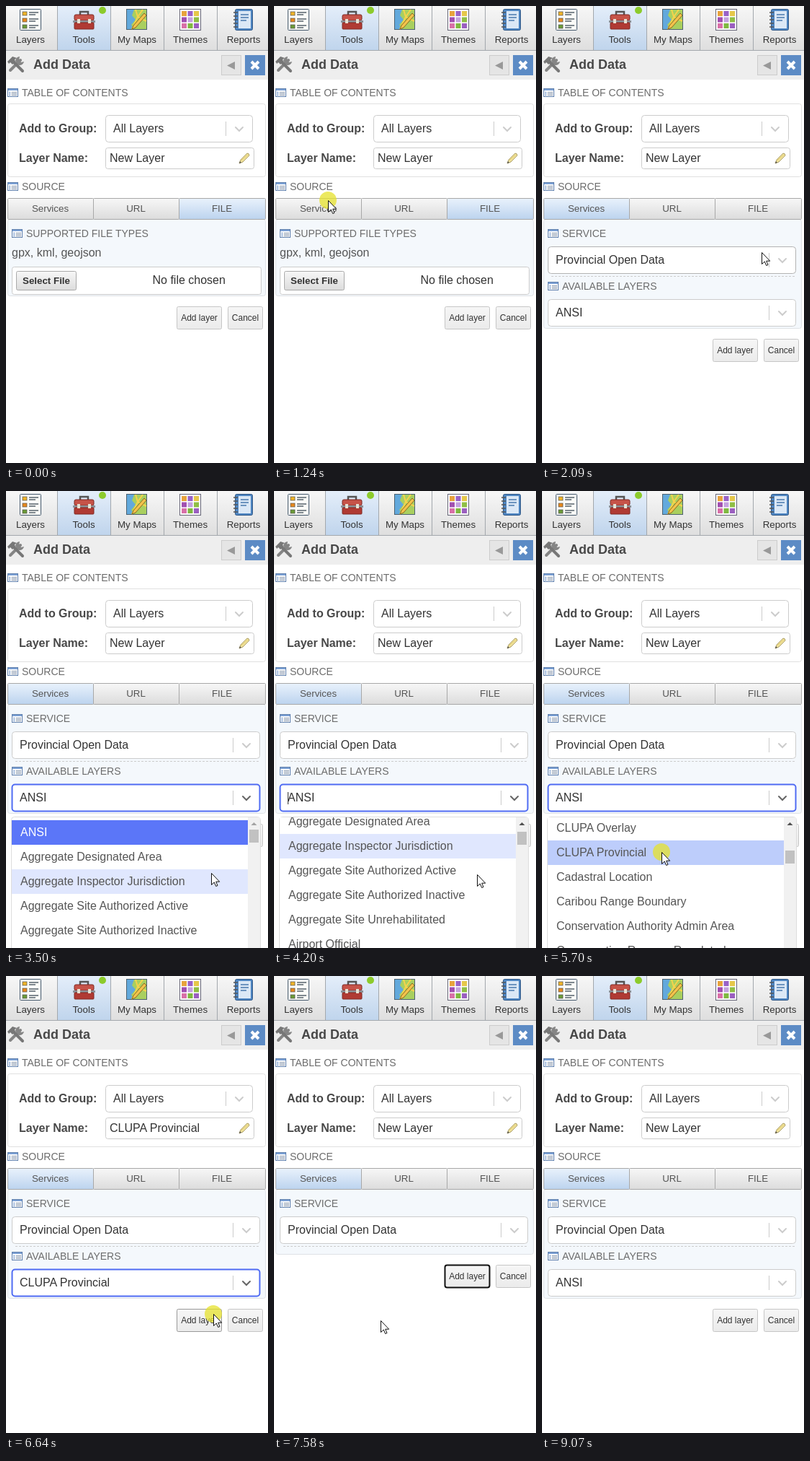
An HTML page for the animation above (9.15 s loop, 364 by 633 pixels).

```html
<!DOCTYPE html>
<html lang="en">
<head>
<meta charset="utf-8">
<title>Add Data</title>
<style>
  html, body { margin: 0; width: 100%; height: 100%; overflow: hidden; background: #fff; }
  svg { display: block; width: 364px; height: 633px; font: 16px "Liberation Sans", Arial, sans-serif; fill: #333; }
  .b { font-weight: bold; fill: #484848; }
  .head { font-size: 14px; fill: #6c6c6c; }
  .small { font-size: 13.333px; }
  .btn { font-size: 12px; }
  .mid { text-anchor: middle; }
  .box { fill: #fff; stroke: #ccc; }
  .line { fill: none; stroke: #ccc; }
  .row { fill: #555; }
</style>
</head>
<body>
<svg id="stage" viewBox="0 0 364 633"></svg>
<script>
const LOOP = 9150, ROW = 34, LIST_TOP = 456;
const layers = ['ANSI', 'Aggregate Designated Area', 'Aggregate Inspector Jurisdiction',
  'Aggregate Site Authorized Active', 'Aggregate Site Authorized Inactive',
  'Aggregate Site Unrehabilitated', 'Airport Official', 'Aquatic Resource Area Line Segment',
  'Aquatic Resource Area Polygon|Segment', 'Bait Harvest Area', 'Bear Management Area',
  'Building As Symbol', 'Building To Scale', 'Built Up Area', 'CLUPA Overlay', 'CLUPA Provincial',
  'Cadastral Location', 'Caribou Range Boundary', 'Conservation Authority Admin Area',
  'Conservation Reserve Regulated', 'Cottage Residential Site'];

// Markup helpers
const text = (x, y, s, cls = '', extra = '') => `<text x="${x}" y="${y}" class="${cls}" ${extra}>${s}</text>`;
const rect = (x, y, w, h, extra = '') => `<rect x="${x}" y="${y}" width="${w}" height="${h}" ${extra}/>`;
const path = (d, extra = '') => `<path d="${d}" ${extra}/>`;
const group = (id, body, extra = '') => `<g id="${id}" ${extra}>${body}</g>`;
const at = (x, y, body) => `<g transform="translate(${x} ${y})">${body}</g>`;
const gradient = (id, top, bottom) => `<linearGradient id="${id}" x2="0" y2="1">
  <stop stop-color="${top}"/><stop offset="1" stop-color="${bottom}"/></linearGradient>`;

const header = (x, y, s) => at(x, y - 11,
  rect(.5, .5, 14, 11, 'fill="#fff" stroke="#6080ad"') + rect(1, 1, 13, 2, 'fill="#7ba0d4"') +
  path('M2.5 5.5H4M2.5 7.5H4M2.5 9.5H4', 'stroke="#2f66b5"') +
  path('M5.5 5.5H13M5.5 7.5H13M5.5 9.5H13', 'stroke="#8998ad"')) + text(x + 20, y, s, 'head');

const select = (id, x, y, w, value) => at(x, y,
  rect(.5, .5, w - 1, 37, `id="${id}Box" class="box" rx="4"`) +
  path(`M${w - 37.5} 9V29`, 'class="line"') +
  path(`M${w - 24} 17l5 5l5-5`, `id="${id}Arrow" fill="none" stroke="#ccc" stroke-width="2" stroke-linecap="round"`) +
  text(11, 24, value, '', `id="${id}Value"`));

const button = (id, x, w, s) => rect(x + .5, .5, w - 1, 31, `id="${id}" rx="2" fill="url(#button)" stroke="#c6c6c6"`) +
  text(x + w / 2, 20, s, 'btn mid');

// Navigation icons, each in a 30px square
const listIcon = rect(.5, .5, 29, 29, 'rx="1" fill="#fcfcf8" stroke="#44586c"') +
  ['#f0b429', '#e8891c', '#6b9b37'].map((c, i) => rect(4, 4 + i * 9, 6, 5, `fill="${c}" stroke="#555" stroke-width=".7"`) +
    path(`M13 ${5 + i * 9}h13m-13 3h9`, 'stroke="#56616c" stroke-width="1.3"')).join('');
const toolboxIcon = path('M10 8V4h11v4', 'fill="none" stroke="#555" stroke-width="2.5"') +
  rect(2, 8, 27, 8, 'rx="2" fill="#c65349" stroke="#7e2923"') +
  rect(0, 16, 31, 3, 'fill="#8c9299"') + rect(2, 19, 27, 9, 'rx="1" fill="#b03a33" stroke="#7e2923"') +
  rect(6, 14, 4, 6, 'fill="#e6e1d2"') + rect(21, 14, 4, 6, 'fill="#e6e1d2"');
const mapIcon = rect(.5, .5, 28, 28, 'fill="#a9cf5f" stroke="#4c6170"') +
  path('M1 1h10l-3 8 5 6-6 7 4 6H1z', 'fill="#62a9dc"') +
  path('M13 1l3 10 12 6M8 28l8-17 7-10', 'fill="none" stroke="#f6d34c" stroke-width="2"') +
  path('M10 23L25 6l3 3L13 26l-5 2z', 'fill="#f2c24d" stroke="#8b6a1f"');
const themesIcon = rect(.5, .5, 29, 29, 'fill="#fff" stroke="#667"') +
  ['#e8a33d', '#9a62c8', '#e6c84a', '#a14fb0', '#c4a2e0', '#8fbf45', '#d870a8', '#7fb840', '#9b5fc0']
    .map((c, i) => rect(3 + i % 3 * 8.5, 3 + Math.floor(i / 3) * 8.5, 7, 7, `fill="${c}"`)).join('');
const reportIcon = rect(4.5, .5, 24, 29, 'rx="2" fill="#4f86c2" stroke="#2c5585"') +
  rect(9, 3, 17, 24, 'fill="#dbe8f6"') + path('M12 8h11m-11 4h11m-11 4h8', 'stroke="#4a78ad" stroke-width="1.4"') +
  path('M2 5h6M2 10h6M2 15h6M2 20h6M2 25h6', 'stroke="#555" stroke-width="1.6"');

const nav = [['Layers', listIcon, 34, 19], ['Tools', toolboxIcon, 108, 93], ['My Maps', mapIcon, 182, 167],
  ['Themes', themesIcon, 256, 241], ['Reports', reportIcon, 330, 314]]
  .map(([s, icon, x, left]) => at(left, 4, icon) + text(x, 51, s, 'small mid')).join('');

const tools = at(2, 69,
  path('M4 20L18 6', 'stroke="#858585" stroke-width="4" stroke-linecap="round"') +
  path('M17 1a6 6 0 1 0 6 7l-4 1-3-3z', 'fill="#858585"') +
  path('M8 8L21 21', 'stroke="#777" stroke-width="4" stroke-linecap="round"') +
  path('M0 8L7 1l6 2-3 2 1 3-4 4-3-3-2 2z', 'fill="#777"'));

const pencil = at(323, 203, path('M1 15l2-5L12 1q3 0 3 3L6 13z', 'fill="#f3e5a0" stroke="#ab9d62"') +
  path('M1 15l1-3 2 2z', 'fill="#555"') + path('M4 11L13 3', 'stroke="#d8c364"'));

const tabs = ['Services', 'URL', 'FILE'].map((s, i) =>
  rect(2.5 + i * 119, 266.5, i == 2 ? 120 : 119, 29, `id="tab${i}" stroke="#a8a8a8" rx="1"`) +
  text([61.5, 180.5, 300][i], 285, s, 'small mid', 'fill="#555"')).join('');

let rowY = LIST_TOP;
const rows = layers.map((name, i) => {
  const lines = name.split('|'), h = ROW + 18 * (lines.length - 1), y = rowY;
  rowY += h;
  return rect(8, y, 328, h, `id="row${i}"`) +
    lines.map((s, k) => text(20, y + 22 + 18 * k, s, 'row', i ? '' : 'style="fill:#fff"')).join('');
}).join('');

document.getElementById('stage').innerHTML = `<defs>
  ${gradient('nav', '#f7f7f7', '#dedede')}${gradient('navOn', '#e4eefa', '#bfd4ec')}
  ${gradient('tab', '#f7f7f7', '#dcdcdc')}${gradient('tabOn', '#e9f2fc', '#bcd3ee')}
  ${gradient('button', '#f6f6f6', '#ebebeb')}
  <clipPath id="list">${rect(8, 452, 328, 181)}</clipPath></defs>` +
  rect(0, 0, 364, 633, 'fill="#fff"') +
  rect(0, 0, 364, 62, 'fill="url(#nav)"') + rect(71, 0, 74, 62, 'fill="url(#navOn)"') +
  path('M71.5 0V61M145.5 0V61M219.5 0V61M293.5 0V61M0 61.5H364', 'stroke="#a3a8ad"') + nav +
  '<circle cx="134" cy="6" r="5" fill="#8ccb2c"/>' +
  rect(0, 62, 364, 40, 'fill="#eee"') + tools + text(38, 87, 'Add Data', 'b', 'font-size="18"') +
  rect(299.5, 68.5, 27, 27, 'fill="#e5e5e5" stroke="#ccc"') + path('M318 77v11l-11-5.500z', 'fill="#999"') +
  rect(332, 68, 28, 28, 'fill="#5c8bc5"') + path('M341 77l10 10m0-10l-10 10', 'stroke="#fff" stroke-width="4"') +
  header(2, 125, 'TABLE OF CONTENTS') + rect(2.5, 135.5, 358, 101, 'rx="3" fill="#fff" stroke="#e0e0e0"') +
  text(18, 175, 'Add to Group:', 'b') + select('group', 138, 151, 205, 'All Layers') +
  text(18, 216, 'Layer Name:', 'b') + rect(138.5, 196.5, 206, 29, 'class="box" rx="3"') +
  text(144, 216, 'New Layer', '', 'id="layerName"') + pencil +
  header(2, 255, 'SOURCE') +
  rect(2.5, 295.5, 358, 106, 'id="panel" rx="3" fill="#f4f8fc" stroke="#dfe2e6"') + tabs +
  group('filePane', header(8, 320, 'SUPPORTED FILE TYPES') + text(8, 347, 'gpx, kml, geojson', '', 'fill="#555"') +
    rect(8.5, 361.5, 346, 38, 'class="box" rx="3"') +
    rect(14.5, 367.5, 83, 26, 'id="selectFile" rx="2" fill="url(#tab)" stroke="#aaa"') +
    text(56, 385, 'Select File', 'small mid', 'font-weight="bold"') + text(203.5, 385, 'No file chosen')) +
  group('servicePane', header(8, 320, 'SERVICE') + select('service', 8, 333, 345, 'Provincial Open Data') +
    path('M13 374.5H351', 'class="line" stroke-dasharray="3 2"')) +
  group('layerPane', header(8, 393, 'AVAILABLE LAYERS') + select('layer', 8, 406, 345, 'ANSI') +
    rect(19, 417, 1, 17, 'id="caret"')) +
  group('buttons', button('add', 237, 63, 'Add layer') + button('cancel', 308, 49, 'Cancel')) +
  group('menu', rect(7.5, 451.5, 346, 190, 'rx="4" fill="#fff" stroke="#ddd"') +
    `<g clip-path="url(#list)">${group('rows', rows)}</g>` + rect(336, 452, 17, 181, 'fill="#f1f1f1"') +
    path('M340.500 463l4-4 4 4z', 'id="upArrow"') + rect(338, 469, 13, 18, 'id="thumb" fill="#c1c1c1"')) +
  '<circle id="press" r="12" fill="#e6e12c" opacity=".75"/>' +
  path('M.5 .5V16.500L4.300 13L6.700 18.500L9 17.500L6.700 12.200H11.700Z', 'id="cursor" fill="#fff" stroke="#111" stroke-linejoin="round"');

const el = Object.fromEntries([...document.querySelectorAll('[id]')].map(e => [e.id, e]));
const show = (e, on) => { e.style.display = on ? '' : 'none'; };
const set = (e, attrs) => { for (const k in attrs) e.setAttribute(k, attrs[k]); };
const put = (e, x, y) => set(e, { transform: `translate(${x} ${y})` });
const label = (e, s) => { if (e.textContent !== s) e.textContent = s; };
const within = (t, a, b) => t >= a && t < b;

// Keys are [time, ...values]; values ease between neighbouring keys
function tween(keys, t) {
  const i = keys.findIndex(k => k[0] > t);
  if (i < 1) return keys[i ? keys.length - 1 : 0].slice(1);
  const a = keys[i - 1], b = keys[i], p = (t - a[0]) / (b[0] - a[0]), e = p * p * (3 - 2 * p);
  return a.slice(1).map((v, k) => v + (b[k + 1] - v) * e);
}

const cursorKeys = [[180, 318, 633], [520, 165, 440], [700, 86, 372], [920, 75, 269], [1600, 75, 269],
  [2090, 305, 341], [2490, 338, 424], [3060, 338, 424], [3500, 285, 529], [3580, 282, 531], [5260, 282, 531],
  [5460, 166, 500], [6050, 166, 500], [6280, 270, 459], [6400, 288, 468], [6690, 288, 468],
  [7030, 148, 479], [7500, 148, 479], [7510, 148, 477], [7700, 148, 477], [8290, 170, 633]];
const scrollKeys = [[4090, 0], [4600, 400], [4800, 400], [5150, 500]];
const presses = [[1240, 1320], [2560, 2640], [5700, 5770], [6640, 6720]];

function render(t) {
  const [x, y] = tween(cursorKeys, t).map(Math.round);
  const scroll = Math.round(tween(scrollKeys, t)[0]);
  const over = (l, top, r, b) => t >= 220 && t < 8290 && x >= l && x < r && y >= top && y < b;
  const services = t >= 1320;
  const available = within(t, 1630, 7510) || t >= 7740;
  const open = within(t, 2640, 5770), focused = within(t, 2640, 6720);
  const chosen = within(t, 5770, 7510);

  for (let i = 0; i < 3; i++) set(el['tab' + i], { fill: `url(#${i == (services ? 0 : 2) ? 'tabOn' : 'tab'})` });
  show(el.filePane, !services);
  show(el.servicePane, services);
  show(el.layerPane, available);
  set(el.panel, { height: !services ? 106 : available ? 151 : 90 });
  put(el.buttons, 0, !services ? 416 : available ? 461 : 400);
  set(el.selectFile, { stroke: over(14, 367, 98, 394) ? '#777' : '#aaa' });

  const addFocus = within(t, 6720, 9070);
  set(el.add, { stroke: addFocus ? '#111' : over(237, 461, 300, 493) ? '#999' : '#c6c6c6', 'stroke-width': addFocus ? 2 : 1, rx: addFocus ? 3 : 2 });

  label(el.layerName, chosen ? 'CLUPA Provincial' : 'New Layer');
  label(el.layerValue, chosen ? 'CLUPA Provincial' : 'ANSI');
  set(el.serviceBox, { style: over(8, 333, 353, 371) ? 'stroke:#b3b3b3' : '' });
  set(el.layerBox, { style: focused ? 'stroke:#506cf3;stroke-width:2' : over(8, 406, 353, 444) ? 'stroke:#b3b3b3' : '' });
  set(el.layerArrow, { stroke: focused ? '#666' : '#ccc' });
  show(el.caret, open && Math.floor((t - 2810) / 500) % 2 === 0);

  show(el.menu, open);
  if (open) {
    // The highlighted row scrolls away with the list until the pointer moves again
    const offset = t < 5270 ? y - LIST_TOP : y - LIST_TOP + scroll - 18;
    const hover = Math.max(0, Math.floor(offset / ROW));
    layers.forEach((_, i) => set(el['row' + i], {
      fill: i === 0 ? '#5b76f8' : i !== hover ? '#fff' : t >= 5700 ? '#bdcdfb' : '#e0e7fe'
    }));
    put(el.rows, 0, -scroll);
    put(el.thumb, 0, Math.round(scroll * .058));
    set(el.upArrow, { fill: scroll ? '#505050' : '#a3a3a3' });
  }

  show(el.press, presses.some(([a, b]) => within(t, a, b)));
  put(el.press, x, y);
  show(el.cursor, within(t, 220, 8290));
  put(el.cursor, x, y);
}

const start = performance.now();
(function frame() {
  render((performance.now() - start) % LOOP);
  requestAnimationFrame(frame);
})();
</script>
</body>
</html>
```
